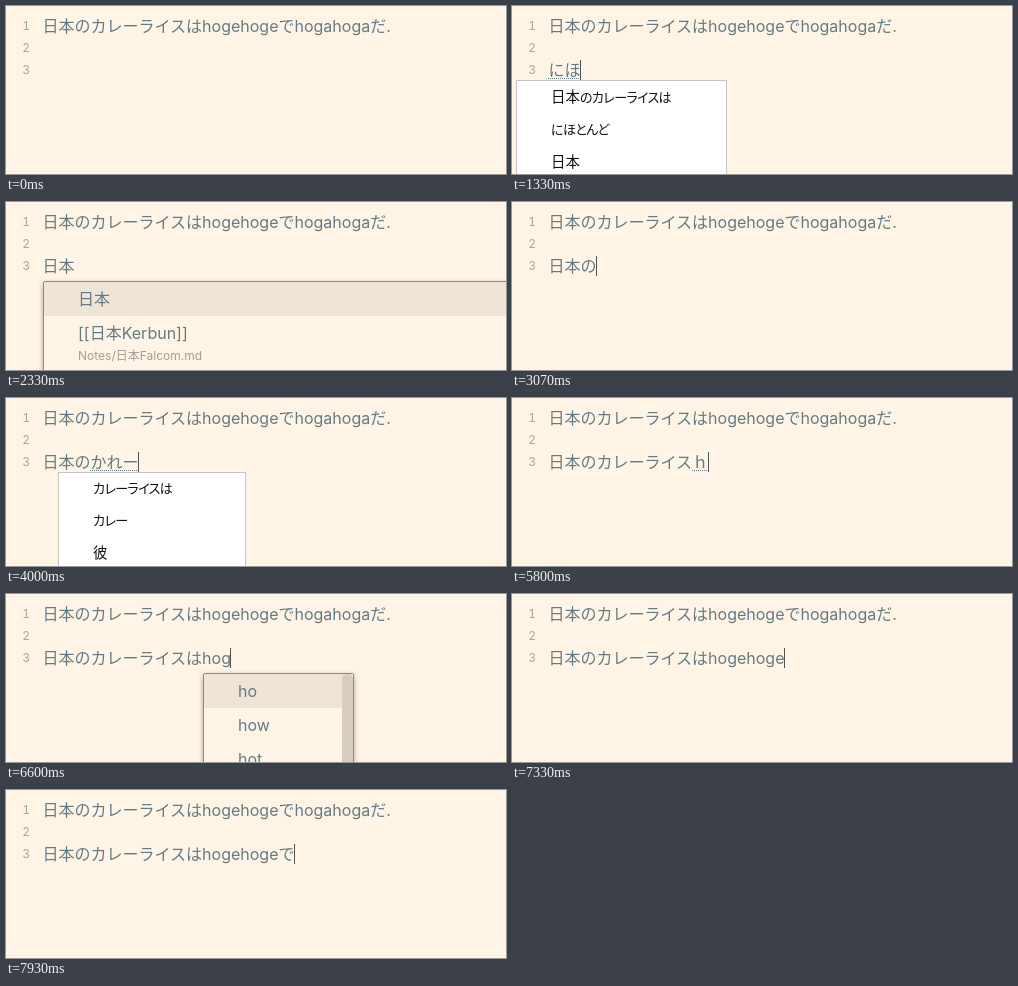
An HTML page for the animation above (8 s loop, 500 by 168 pixels).

```html
<!DOCTYPE html>
<html lang="ja">
<head>
<meta charset="utf-8">
<title>Editor completion</title>
<style>
html, body { margin: 0; width: 100%; height: 100%; overflow: hidden; }
body {
  position: relative; background: #fff4e5; color: #657b83;
  font: 16px/22px Inter, "Noto Sans CJK JP DemiLight", "Noto Sans CJK JP Light",
    "Noto Sans CJK JP", "Noto Sans CJK", sans-serif;
  white-space: pre;
}
.line { position: absolute; left: 36.6px; }
.number {
  position: absolute; left: 0; width: 24px; text-align: right;
  font-size: 12px; font-variant-numeric: tabular-nums; color: #a9a6a0;
}
#composing { text-decoration: underline dotted 1px; text-underline-offset: 2px; }
#caret {
  position: absolute; top: 1px; width: 1px; height: 20px;
  margin-left: -.6px; background: #4c5658;
}
.popup { position: absolute; box-sizing: border-box; }
.ime {
  top: 74px; height: 110px; background: #fff; border: 1px solid #c8c5c0; color: #111;
  font: 13px/32px "Noto Sans CJK JP", "Noto Sans CJK", sans-serif;
  font-feature-settings: "palt"; letter-spacing: -.6px;
}
.ime div { padding-left: 34px; position: relative; top: -1px; }
.kanji { font-size: 14.5px; letter-spacing: 0; }
.suggest {
  top: 79px; background: #fff4e5; border: 1px solid #858b88;
  border-radius: 2px; box-shadow: 0 2px 5px rgba(0, 0, 0, .35); overflow: hidden;
}
.suggest div { padding: 6px 10px 6px 34px; }
.suggest div:first-child { background: #efe5d7; }
.suggest small { display: block; font-size: 12px; line-height: 24px; color: #a19e98; }
.scroll::after {
  content: ""; position: absolute; top: 0; right: 0; bottom: 0; width: 11px;
  border-radius: 5px; background: #d7cdc0;
}
</style>
</head>
<body>
<div class="number" style="top:9px">1</div>
<div class="number" style="top:31px">2</div>
<div class="number" style="top:53px">3</div>
<div class="line" style="top:9px">日本のカレーライスはhogehogeでhogahogaだ.</div>
<div class="line" style="top:53px"><span id="text"></span><span id="composing"></span><i id="caret"></i></div>
<div id="popup"></div>
<script>
const LOOP = 8000;
const $ = id => document.getElementById(id);
const rows = items => items.map(item => `<div>${item}</div>`).join('');
const popup = (kind, left, width, items) =>
  `<div class="popup ${kind}" style="left:${left}px;width:${width}">${rows(items)}</div>`;
const markKanji = word => word.replace(/\p{Script=Han}+/gu, '<span class="kanji">$&</span>');
const ime = (left, width, ...words) => popup('ime', left, width + 'px', words.map(markKanji));
const suggest = (left, ...items) => popup('suggest', left, 'auto', items);

const ni = ime(4, 211, '日本のカレーライスは', 'には', 'に');
const niho = ime(4, 211, '日本のカレーライスは', 'にほとんど', '日本');
const no = ime(36, 188, 'の', 'のカレーライスは', 'のは');
const ka = ime(52, 192, 'カレーライスは', 'から', 'か');
const kare = ime(52, 188, 'カレーライスは', 'カレー', '彼');
const ha = ime(148, 188, 'は', 'はい', 'はず');
const de = ime(240, 188, 'で', 'です', 'では');
const nihonNotes = popup('suggest', 37, '520px',
  ['日本', '[[日本Kerbun]]<small>Notes/日本Falcom.md</small>']);
const curry = suggest(85, 'カレーライス');
const hoWords = popup('suggest scroll', 197, '151px', ['ho', 'how', 'hot']);
const hoge = suggest(197, 'hogehoge');

const A = '日本', B = A + 'の', C = B + 'カレー', D = B + 'カレーライス', E = D + 'は';
const HIDDEN = true;

// start time, committed text, text being composed, popup, caret hidden
const steps = [
  [0, '', '', '', HIDDEN],
  [400, ''],
  [800, '', 'ｎ'],
  [870, '', 'に'],
  [930, '', 'に', ni],
  [1070, '', 'にｈ', ni],
  [1200, '', 'にほ', ni],
  [1330, '', 'にほ', niho],
  [1470, '', 'にほｎ', niho],
  [1600, '', 'にほん', niho],
  [1730, '', A],
  [1870, A],
  [1930, A, '', nihonNotes],
  [2330, A, '', nihonNotes, HIDDEN],
  [2600, A, 'ｎ'],
  [2870, A, 'の'],
  [2930, A, 'の', no],
  [3070, B],
  [3470, B, 'ｋ'],
  [3530, B, 'か'],
  [3600, B, 'か', ka],
  [3670, B, 'かｒ', ka],
  [3730, B, 'かれ', ka],
  [3800, B, 'かれ', kare],
  [4000, B, 'かれー', kare],
  [4200, B, 'カレー'],
  [4400, C],
  [4470, C, '', curry],
  [4870, C, '', curry, HIDDEN],
  [5330, D],
  [5730, D, 'ｈ'],
  [5870, D, 'は'],
  [5930, D, 'は', ha],
  [6070, E],
  [6400, E + 'h'],
  [6470, E + 'ho'],
  [6530, E + 'ho', '', hoWords],
  [6600, E + 'hog', '', hoWords],
  [6670, E + 'hog', '', hoge],
  [7200, E + 'hog', '', hoge, HIDDEN],
  [7330, E + 'hogehoge'],
  [7800, E + 'hogehoge', 'ｄ'],
  [7870, E + 'hogehoge', 'で', de],
  [7930, E + 'hogehogeで'],
];

let shown;
function render(now) {
  const time = now % LOOP;
  const step = steps.findLast(([start]) => start <= time);
  if (step !== shown) {
    const [, text, composing = '', list = '', hidden = false] = step;
    $('text').textContent = text;
    $('composing').textContent = composing;
    $('popup').innerHTML = list;
    $('caret').hidden = hidden;
    shown = step;
  }
}

const origin = performance.now();
function tick() {
  render(performance.now() - origin);
  requestAnimationFrame(tick);
}
tick();
</script>
</body>
</html>
```
